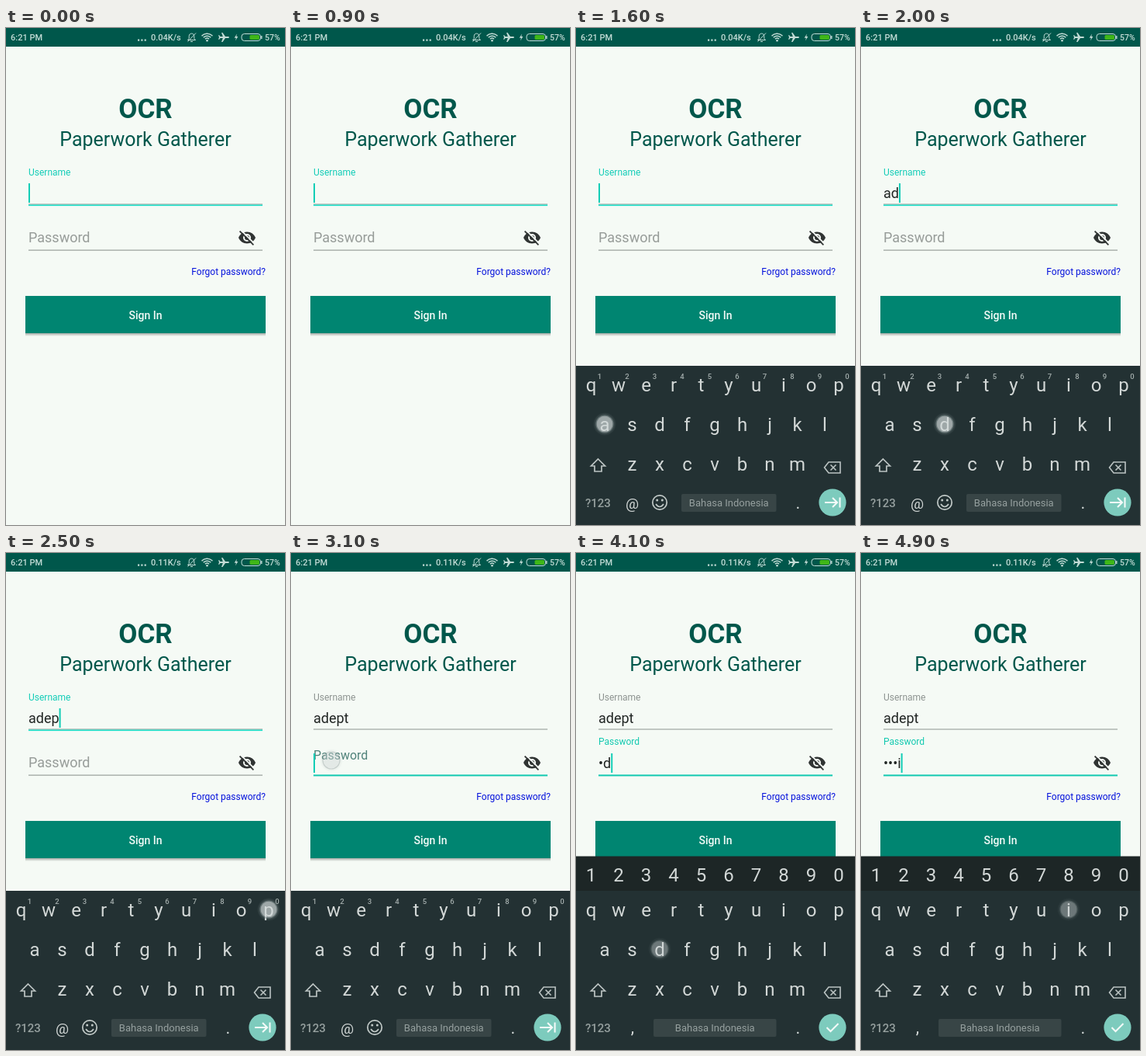
These frames come from a looping animation (360 by 640 pixels, 5 s). An HTML page with a canvas:

```html
<!DOCTYPE html>
<html lang="en">
<head>
<meta charset="utf-8">
<title>Sign in</title>
<style>
html, body { margin: 0; width: 100%; height: 100%; overflow: hidden; background: #f5faf5; }
canvas { display: block; width: 360px; height: 640px; }
</style>
</head>
<body>
<canvas id="stage"></canvas>
<script>
const LOOP = 5000, STEP = 100;
const BG = '#f5faf5', DARK = '#00574b', STATUS = '#c3dcd6', KEY = '#d3d8d7', DIM = '#96a09f';
const canvas = document.getElementById('stage');
const ctx = canvas.getContext('2d');
const ratio = window.devicePixelRatio || 1;
canvas.width = 360 * ratio;
canvas.height = 640 * ratio;

const clamp = v => Math.max(0, Math.min(1, v));
const smooth = v => v * v * (3 - 2 * v);
const mix = (a, b, p) => a + (b - a) * p;
const during = (t, from, to) => t >= from && t < to;

// Keyboard layout
const PITCH = 35.5;
const ROWS = [
  { keys: 'qwertyuiop', x: 19.5, y: 468 },
  { keys: 'asdfghjkl', x: 37, y: 519 },
  { keys: 'zxcvbnm', x: 72.5, y: 570 }
];
function keyPoint(key) {
  const row = ROWS.find(r => r.keys.includes(key));
  return [row.x + row.keys.indexOf(key) * PITCH, row.y - 9];
}

// Touches: a key or a point, from, to
const USER = [['a', 1700], ['d', 2000], ['e', 2300], ['p', 2500], ['t', 2700]];
const PASS = [['a', 3700], ['d', 4000], ['n', 4400], ['i', 4800]];
const touches = [
  { at: [80, 214], from: 600, to: 800 },
  { at: [52, 267], from: 2900, to: 3200 },
  ...[...USER, ...PASS].map(([key, time]) => ({ at: keyPoint(key), from: time - 100, to: time + 200 }))
];
const typed = (list, t) => list.filter(([, time]) => t >= time).map(([key]) => key).join('');

function text(str, x, y, size, color, align = 'left', weight = 400) {
  ctx.font = `${weight} ${size}px Roboto, sans-serif`;
  ctx.textAlign = align;
  ctx.fillStyle = color;
  ctx.fillText(str, x, y);
  return ctx.measureText(str).width;
}
function rect(x, y, w, h, color) {
  ctx.fillStyle = color;
  ctx.fillRect(x, y, w, h);
}
function disc(x, y, r, color) {
  ctx.fillStyle = color;
  ctx.beginPath();
  ctx.arc(x, y, r, 0, Math.PI * 2);
  ctx.fill();
}
function round(x, y, w, h, r) {
  ctx.beginPath();
  ctx.roundRect(x, y, w, h, r);
}
function line(d, color, width, x = 0, y = 0) {
  ctx.save();
  ctx.translate(x, y);
  ctx.strokeStyle = color;
  ctx.lineWidth = width;
  ctx.stroke(new Path2D(d));
  ctx.restore();
}
function shape(d, color, x, y) {
  ctx.save();
  ctx.translate(x, y);
  ctx.fillStyle = color;
  ctx.fill(new Path2D(d), 'evenodd');
  ctx.restore();
}

function statusBar(t) {
  rect(0, 0, 360, 24, DARK);
  text('6:21 PM', 6, 16.3, 11, STATUS, 'left', 500);
  for (const x of [171, 175.3, 179.6]) rect(x - 1, 14.5, 2.2, 2.2, STATUS);
  text(t < 2500 ? '0.04K/s' : '0.11K/s', 187, 16.3, 11, STATUS, 'left', 500);
  line('M-5 3.5H5L3.3 1.5V-1.5C3.3-6-3.3-6-3.3-1.5V1.5ZM-1.5 5.5H1.5M-5 5.5L5.5-5.5', STATUS, 1, 239.5, 12);
  ctx.strokeStyle = STATUS;
  ctx.lineWidth = 1.5;
  for (const r of [3.4, 6.3, 9.3]) {
    ctx.beginPath();
    ctx.arc(259.5, 16.5, r, -Math.PI * 0.77, -Math.PI * 0.23);
    ctx.stroke();
  }
  disc(259.5, 16.3, 1.3, STATUS);
  shape('M7 0Q7-1 5.5-1H2L-1.5-6H-3L-1.2-1H-4.5L-5.8-2.8H-7L-6 0L-7 2.8H-5.8L-4.5 1H-1.2L-3 6H-1.5L2 1H5.5Q7 1 7 0Z', STATUS, 281, 12);
  shape('M1-4.5L-2.3 .7H0L-1 4.5L2.3-.9H.2Z', STATUS, 297, 12);
  ctx.strokeStyle = STATUS;
  ctx.lineWidth = 1;
  round(304, 7.5, 24.5, 9, 3.5);
  ctx.stroke();
  rect(329.2, 10, 1.3, 4, STATUS);
  round(314.5, 9, 12.5, 6, 1.5);
  ctx.fillStyle = '#3fb618';
  ctx.fill();
  text('57%', 334, 16.3, 10.5, STATUS, 'left', 500);
}

function eyeOff() {
  shape('M1 12C2.7 7.6 7 4.5 12 4.5S21.3 7.6 23 12C21.3 16.4 17 19.5 12 19.5S2.7 16.4 1 12Z' +
    'M7 12a5 5 0 1 0 10 0a5 5 0 1 0-10 0ZM9 12a3 3 0 1 0 6 0a3 3 0 1 0-6 0Z', '#303433', 299, 258);
  line('M4 2.2L22 20.2', BG, 1.8, 299, 258);
  line('M2.6 3.6L20.4 21.4', '#303433', 1.8, 299, 258);
}

function cursor(x, y) {
  rect(x, y, 2, 25, '#12cdb6');
}

function form(t) {
  const onPass = t >= 3000;
  text('OCR', 180, 116, 35, DARK, 'center', 700);
  text('Paperwork Gatherer', 180, 152, 25, DARK, 'center');

  text('Username', 29, 190, 12, onPass ? '#8d9390' : '#14cdb8');
  const userWidth = text(typed(USER, t), 29, 219, 18, '#202523');
  rect(29, 226.5, 302, 1, '#8b9590');
  if (!onPass) rect(29, 227.5, 302, 1.6, '#1ddfc9');
  const userCursor = t < 100 || during(t, 600, 1100) || during(t, 1600, 3000);
  if (userCursor) cursor(29 + userWidth, 200);

  const lift = smooth(clamp((t - 3000) / 250));
  const hint = !onPass ? '#979c99' : t < 3200 ? '#50827a' : '#12c9b0';
  text('Password', 29, mix(276, 247, lift), mix(18, 12, lift), hint);
  const secret = typed(PASS, t);
  const masked = '\u2022'.repeat(Math.max(0, secret.length - 1)) + secret.slice(-1);
  const passWidth = text(masked, 29, 277, 18, '#202523');
  if (onPass) {
    rect(29, 285.4, 302, 2, '#12c9b0');
    cursor(29 + passWidth, 258);
  } else rect(29, 285.6, 302, 1, '#858d89');
  eyeOff();
  text('Forgot password?', 335, 317.5, 12, '#0512dc', 'right');

  const shadow = ctx.createLinearGradient(0, 393, 0, 397);
  shadow.addColorStop(0, 'rgba(0,0,0,.32)');
  shadow.addColorStop(1, 'rgba(0,0,0,0)');
  rect(25, 393, 310, 4, shadow);
  rect(25, 345, 310, 48, '#008571');
  text('Sign In', 180, 374.7, 14, '#f2faf7', 'center', 500);
}

function keyboard(t) {
  if (t < 1000) return;
  const numbers = t >= 3200;
  const drop = 55 * Math.pow(0.055, (t - 1000) / 100);
  ctx.save();
  ctx.translate(0, drop > 0.1 ? Math.round(drop) : 0);
  rect(0, 435, 360, 205, '#233133');
  if (numbers) rect(0, 390.5, 360, 44.5, '#1d2626');

  ROWS.forEach((row, r) => [...row.keys].forEach((key, i) => {
    const x = row.x + i * PITCH, digit = (i + 1) % 10;
    text(key, x, row.y, 24, KEY, 'center');
    if (r) return;
    if (numbers) text(digit, x, 422.5, 24, KEY, 'center');
    else text(digit, x + 11, 452, 9.5, '#a3adac', 'center', 500);
  }));

  line('M0-8L9 1H4.5V8H-4.5V1H-9Z', '#bcc4c3', 1.7, 28.5, 563);
  line('M-10.5 0L-5-7H10V7H-5ZM-2.5-3.5L4.5 3.5M4.5-3.5L-2.5 3.5', '#bcc4c3', 1.6, 331, 566);
  text('?123', 12, 616.5, 15, DIM, 'left', 500);
  if (numbers) text(',', 73, 618, 22, KEY, 'center');
  else {
    text('@', 72.5, 619, 19, KEY, 'center');
    line('M-9.2 0a9.2 9.2 0 1 0 18.4 0a9.2 9.2 0 1 0-18.4 0M-5 2Q0 9 5 2', '#c2cac8', 1.7, 108, 611);
    disc(104.7, 608, 1.5, '#c2cac8');
    disc(111.3, 608, 1.5, '#c2cac8');
  }
  const left = numbers ? 100 : 136;
  round(left, 600, 258.5 - left, 23, 2);
  ctx.fillStyle = '#384546';
  ctx.fill();
  text('Bahasa Indonesia', (left + 258.5) / 2, 616, 13, DIM, 'center');
  text('.', 286.5, 619, 22, KEY, 'center');
  disc(331, 611, 17.6, '#7dcbbd');
  line(numbers ? 'M-7.5 0L-2.5 5L7.5-5' : 'M-10 0H6M0-6L6 0L0 6M9.5-6.5V6.5', '#f3faf8', 2.1, 331, 611);
  ctx.restore();
}

function touch({ at: [x, y], from, to }, t) {
  if (!during(t, from, to)) return;
  ctx.save();
  ctx.globalAlpha = t >= to - STEP ? 0.55 : 1;
  const halo = ctx.createRadialGradient(x, y, 9, x, y, 15);
  halo.addColorStop(0, 'rgba(150,165,165,.4)');
  halo.addColorStop(1, 'rgba(150,165,165,0)');
  disc(x, y, 15, halo);
  disc(x, y, 10.5, 'rgba(235,240,240,.5)');
  ctx.strokeStyle = 'rgba(125,140,140,.55)';
  ctx.lineWidth = 1.2;
  ctx.beginPath();
  ctx.arc(x, y, 11, 0, Math.PI * 2);
  ctx.stroke();
  ctx.restore();
}

function draw(t) {
  ctx.setTransform(ratio, 0, 0, ratio, 0, 0);
  rect(0, 0, 360, 640, BG);
  statusBar(t);
  form(t);
  keyboard(t);
  touches.forEach(item => touch(item, t));
}

let start;
function tick(now) {
  start ??= now;
  draw(Math.floor(((now - start) % LOOP) / STEP) * STEP);
  requestAnimationFrame(tick);
}
draw(0);
requestAnimationFrame(tick);
</script>
</body>
</html>
```
